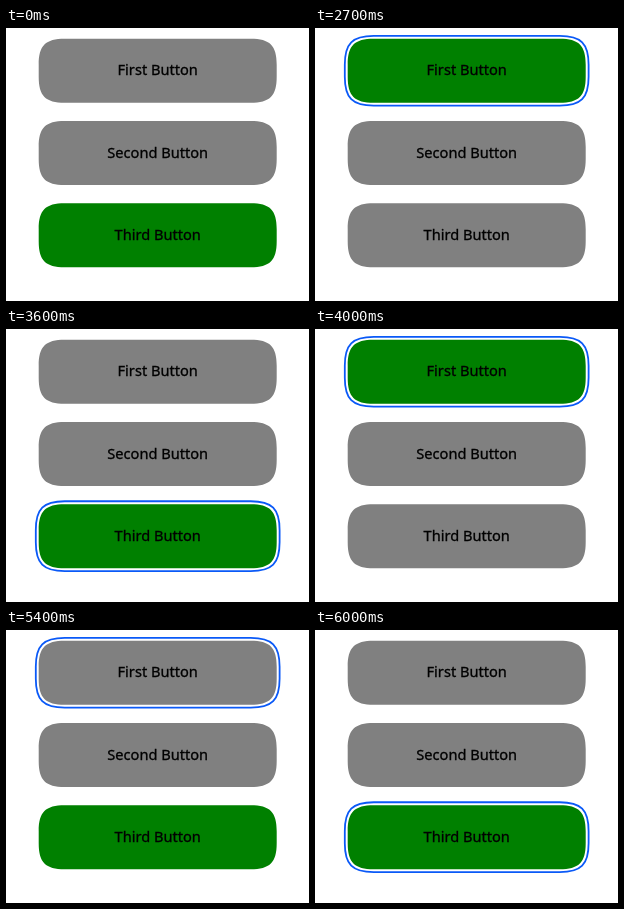
Write an HTML page that moves like this. It is 303 px wide and 273 px high and loops after 10000 ms.

```html
<!DOCTYPE html>
<html lang="en">
<head>
<meta charset="utf-8">
<title>Button focus</title>
<style>
html, body { margin: 0; width: 100%; height: 100%; overflow: hidden; background: #fff; }
svg { display: block; width: 303px; height: 273px; }
text {
  font: 500 14.6px "Noto Sans", "Open Sans", sans-serif;
  text-anchor: middle; fill: #000; stroke: #000; stroke-width: .3;
}
.ring { fill: none; stroke: #0a59f7; stroke-width: 1.8; }
</style>
</head>
<body>
<svg id="stage" viewBox="0 0 303 273"></svg>
<script>
const LOOP = 10000;
const LABELS = ["First Button", "Second Button", "Third Button"];
const GREY = "#808080", GREEN = "#008000";
const LEFT = 32.7, TOP = 10.75, WIDTH = 238, HEIGHT = 64, PITCH = 82.2;
const CORNER = 26, SMOOTH = 0.74, GAP = 2.9;

// Each tab press moves the ring one button on; the fill follows, sometimes a little late.
const RING_MOVES = [2200, 2700, 3100, 3500, 4000, 4200, 4500, 5400, 5700, 6000];
const FILL_MOVES = [2700, 3100, 3600, 4000, 4300, 4600, 5500, 5700, 6000];

const stage = document.getElementById("stage");

function add(tag, attrs) {
  const el = document.createElementNS("http://www.w3.org/2000/svg", tag);
  for (const key in attrs) el.setAttribute(key, attrs[key]);
  return stage.appendChild(el);
}

// Rounded box whose corners ease into the straight sides
function box(top, grow, attrs) {
  const x = LEFT - grow, y = top - grow;
  const w = WIDTH + 2 * grow, h = HEIGHT + 2 * grow;
  const r = CORNER + grow, k = r * SMOOTH, n = r - k;
  const d = `M${x + r} ${y}h${w - 2 * r}c${k} 0 ${r} ${n} ${r} ${r}`
    + `v${h - 2 * r}c0 ${k} ${-n} ${r} ${-r} ${r}`
    + `h${2 * r - w}c${-k} 0 ${-r} ${-n} ${-r} ${-r}`
    + `v${2 * r - h}c0 ${-k} ${n} ${-r} ${r} ${-r}z`;
  return add("path", { d, ...attrs });
}

const buttons = LABELS.map((label, i) => {
  const y = TOP + i * PITCH;
  const face = box(y, 0, { fill: GREY });
  const ring = box(y, GAP, { class: "ring" });
  add("text", { x: LEFT + WIDTH / 2, y: y + 36.7 }).textContent = label;
  return { face, ring };
});

const countUntil = (times, t) => times.filter(time => time <= t).length;

function draw(now) {
  const t = now % LOOP;
  const moves = countUntil(RING_MOVES, t);
  const focused = moves ? (moves + 1) % 3 : -1;
  const active = (countUntil(FILL_MOVES, t) + 2) % 3;
  buttons.forEach(({ face, ring }, i) => {
    face.setAttribute("fill", i === active ? GREEN : GREY);
    ring.setAttribute("visibility", i === focused ? "visible" : "hidden");
  });
}

let start;
function tick(now) {
  start ??= now;
  draw(now - start);
  requestAnimationFrame(tick);
}
draw(0);
requestAnimationFrame(tick);
</script>
</body>
</html>
```
